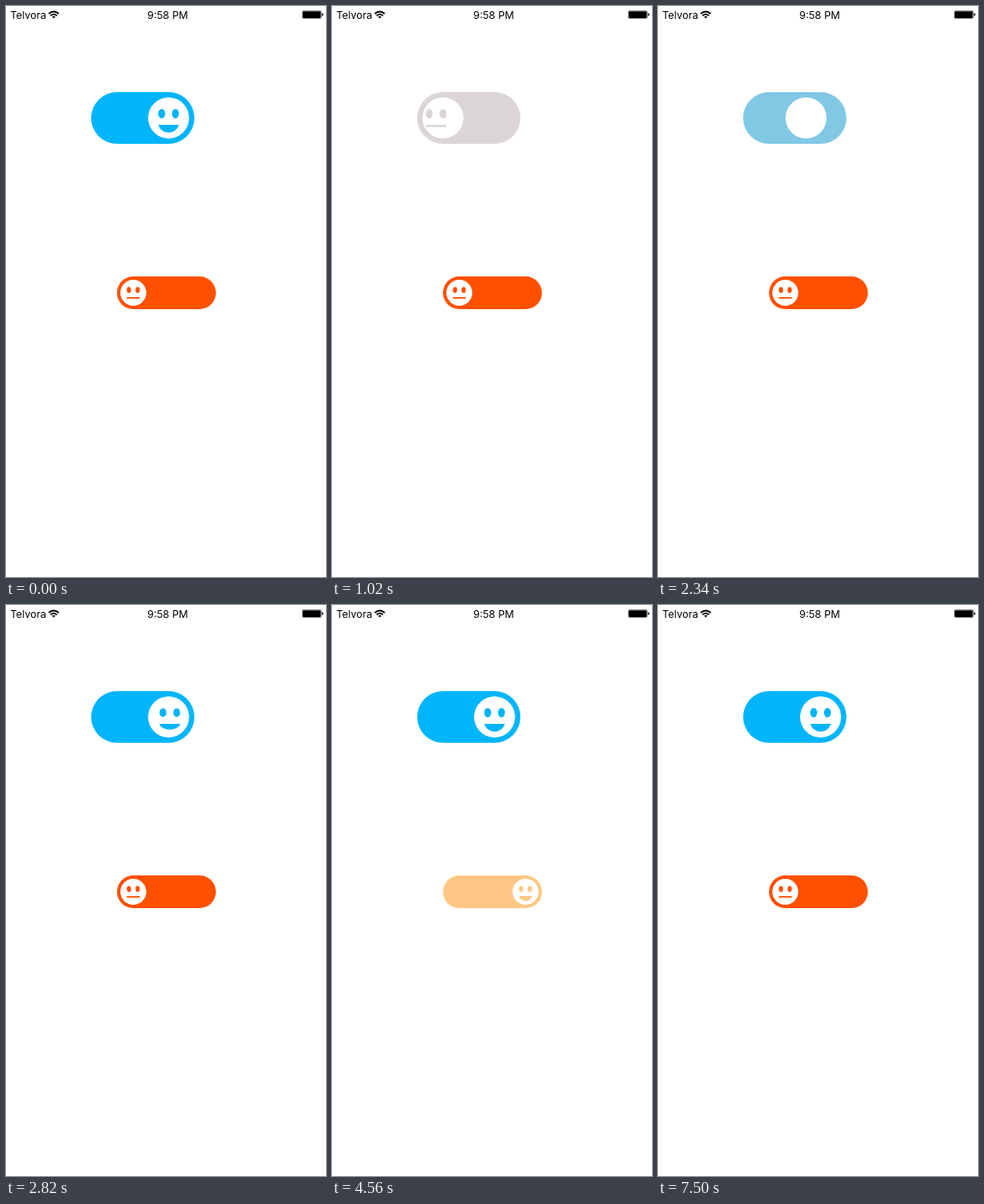
Write an HTML page that moves like this. It is 372x663 px and loops after 7.56 s.

```html
<!DOCTYPE html>
<html lang="en">
<head>
<meta charset="utf-8">
<title>Face switches</title>
<style>
  html, body { margin: 0; width: 100%; height: 100%; overflow: hidden; background: #fff; }
  svg { display: block; width: 372px; height: 663px; }
  text { font: 12px Inter, Roboto, sans-serif; }
</style>
</head>
<body>
<svg id="stage" viewBox="0 0 372 663">
  <clipPath id="disc"><circle r="24"/></clipPath>
  <text x="5" y="14.5">Telvora</text>
  <g fill="none" stroke="#000" stroke-width="1.8">
    <path d="M49.7 9Q55.5 4 61.3 9M51.8 11.2Q55.5 8 59.2 11.2"/>
    <path d="M53.5 12.3Q55.5 11 57.5 12.3L55.5 14.4Z" fill="#000" stroke="none"/>
  </g>
  <text x="188" y="14.5" text-anchor="middle" font-weight="600">9:58 PM</text>
  <rect x="344.5" y="5.5" width="22" height="9" rx="1.5" fill="#fff" stroke="#777" stroke-width=".8"/>
  <rect x="345" y="6.2" width="20.8" height="7.7" rx=".8"/>
  <path d="M367.3 8.3Q369 8.6 369 10T367.3 11.7Z"/>
</svg>
<script>
const LOOP = 7560, FACE = 48;
const stage = document.getElementById('stage');
const clamp = v => Math.min(1, Math.max(0, v));
const ramp = (v, a, b) => clamp((v - a) / (b - a));
const mix = (a, b, k) => a + (b - a) * k;

// slide: ms the face needs to cross; fade: colour exponents for turning on and off
const switches = [
  { x: 99, y: 100, w: 120, h: 60, on: [0, 181, 252], off: [219, 214, 213],
    slide: 880, fade: [2.7, 1], start: true, taps: [132, 1709] },
  { x: 129, y: 314, w: 115, h: 38, on: [255, 199, 131], off: [255, 80, 0],
    slide: 288, fade: [1, .48], start: false, taps: [3825, 5190] }
];

function add(parent, tag, attrs = {}) {
  const el = document.createElementNS('http://www.w3.org/2000/svg', tag);
  set(el, attrs);
  parent.append(el);
  return el;
}

function set(el, attrs) {
  for (const key in attrs) el.setAttribute(key, attrs[key]);
}

for (const s of switches) {
  s.pill = add(stage, 'rect', { x: s.x, y: s.y, width: s.w, height: s.h, rx: s.h / 2 });
  s.face = add(stage, 'g', { 'clip-path': 'url(#disc)' });
  add(s.face, 'circle', { r: FACE / 2, fill: '#fff' });
  s.look = add(s.face, 'g');
  s.eyes = [-8, 8].map(cx => add(s.look, 'ellipse', { cx, cy: -5, rx: 4 }));
  s.mouth = add(s.look, 'path');
}

// Eyes roll out ahead of the face, return from behind, overshoot and settle.
function eyeShift(p) {
  if (p < .5) return 2 * p;
  if (p < 1) return mix(-1, 1 / 6, ramp(p, .68, 1));
  return mix(1 / 6, 0, ramp(p, 1.1, 1.3));
}

function draw(s, time) {
  const count = s.taps.filter(tap => tap <= time).length;
  const p = count ? (time - s.taps[count - 1]) / s.slide : 2;
  const on = s.start !== (count % 2 === 1);
  const dir = on ? 1 : -1;
  const moved = clamp(p);
  const place = on ? moved : 1 - moved;
  const tint = on ? moved ** s.fade[0] : (1 - moved) ** s.fade[1];
  const fill = `rgb(${s.off.map((c, i) => Math.round(mix(c, s.on[i], tint)))})`;
  const happy = p < .5 ? !on : on;
  const smile = happy ? (on ? ramp(p, 1, 1.4) : 1) : 0;
  const blink = Math.abs(1 - 2 * ramp(p, 1.25, 1.5));
  const cx = s.x + s.h / 2 + place * (s.w - s.h);

  set(s.pill, { fill });
  set(s.face, { transform: `translate(${cx} ${s.y + s.h / 2}) scale(${s.h / 60})` });
  set(s.look, { fill, transform: `translate(${dir * eyeShift(p) * FACE})` });
  s.eyes.forEach(eye => set(eye, { ry: 5.5 * blink }));
  const depth = mix(0, 12, smile), lip = mix(10.5, 8, smile);
  set(s.mouth, { d: `M-12 8H12V${lip}C8 ${lip + depth} -8 ${lip + depth} -12 ${lip}Z` });
}

function tick(now) {
  switches.forEach(s => draw(s, now % LOOP));
  requestAnimationFrame(tick);
}
tick(0);
</script>
</body>
</html>
```
